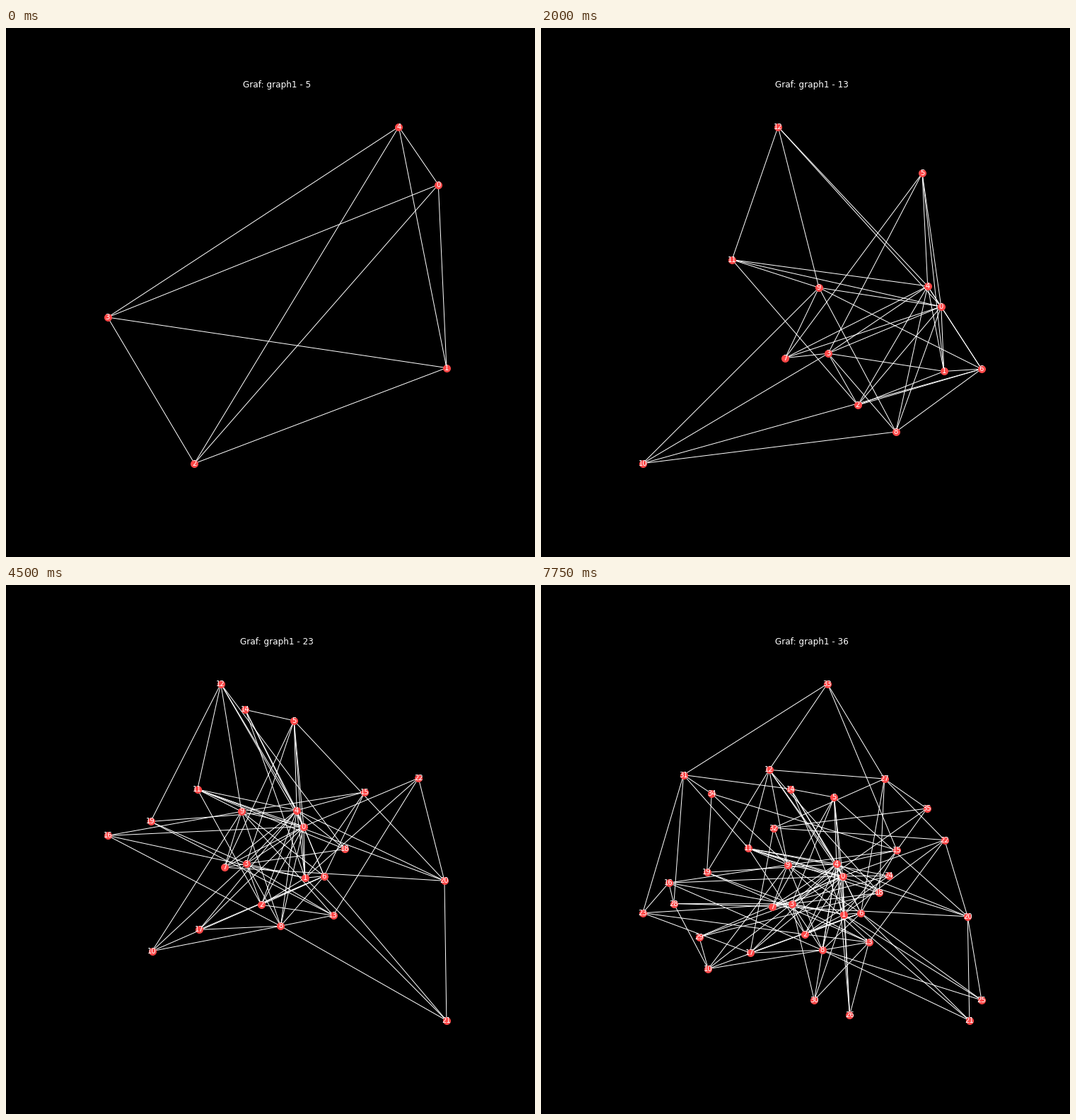
Recreate the animation shown at these times as a matplotlib script. Size 748 by 748 pixels, loop 8 s.

```python
from itertools import combinations

import matplotlib.pyplot as plt
import numpy as np
from matplotlib.animation import FuncAnimation
from matplotlib.collections import LineCollection

SIZE, DPI = 748, 72
FIRST, LAST = 5, 36
STEP_MS = 250
MARGIN = 0.105  # share of the data span left free on each side

# Node places; y points down.
NODES = np.array([
    (426.53, 411.55), (428.32, 465.68), (373.40, 493.93), (354.51, 450.74),
    (417.92, 394.46), (414.48, 300.08), (452.26, 463.73), (327.17, 454.51),
    (397.67, 516.28), (348.66, 395.73), (236.37, 542.71), (293.28, 372.33),
    (322.61, 261.30), (463.58, 505.05), (353.24, 288.50), (503.23, 375.17),
    (180.70, 421.10), (295.70, 520.10), (478.40, 435.30), (234.56, 406.30),
    (603.20, 468.70), (605.80, 615.70), (570.60, 360.50), (143.80, 463.70),
    (491.70, 411.20), (622.90, 586.90), (436.50, 608.00), (485.60, 274.00),
    (187.80, 450.50), (223.60, 497.50), (386.40, 587.00), (201.50, 268.50),
    (329.00, 343.50), (405.00, 139.70), (241.30, 295.00), (545.70, 316.00),
])

# Every node after the first five joins four earlier ones.
LINKS = [
    (0, 1, 3, 4), (0, 1, 2, 4), (0, 3, 4, 5), (0, 3, 4, 6), (0, 6, 7, 8),
    (3, 6, 8, 9), (0, 2, 4, 9), (0, 4, 9, 11), (2, 3, 8, 9), (0, 1, 4, 5),
    (1, 4, 6, 9), (0, 1, 8, 9), (0, 4, 6, 8), (3, 4, 11, 12), (3, 4, 12, 13),
    (4, 5, 7, 11), (1, 6, 8, 20), (0, 1, 13, 20), (2, 3, 16, 17),
    (0, 2, 7, 11), (1, 6, 8, 20), (0, 1, 4, 13), (6, 12, 18, 22),
    (3, 7, 10, 16), (0, 3, 10, 18), (1, 3, 4, 13), (11, 14, 23, 28),
    (9, 17, 22, 27), (12, 15, 27, 31), (9, 15, 19, 31), (3, 15, 27, 32),
]
EDGES = list(combinations(range(FIRST), 2))
EDGES += [(old, new) for new, row in enumerate(LINKS, FIRST) for old in row]

fig = plt.figure(figsize=((SIZE + 1e-6) / DPI,) * 2, dpi=DPI, facecolor="black")
ax = fig.add_axes([0.125, 0.11, 0.775, 0.77])
ax.axis("off")
title = ax.set_title("", color="white", fontsize=12, family="DejaVu Sans")
lines = LineCollection([], colors="white", linewidths=1, zorder=1)
ax.add_collection(lines, autolim=False)
dots = ax.scatter([], [], s=100, c="#ff4848", linewidths=1, zorder=2)
labels = [
    ax.text(x, y, str(i), color="white", fontsize=10, family="DejaVu Sans",
            ha="center", va="center", zorder=3)
    for i, (x, y) in enumerate(NODES)
]


def draw(frame):
    count = FIRST + frame
    shown = NODES[:count]
    low, high = shown.min(axis=0), shown.max(axis=0)
    pad = MARGIN * (high - low)
    ax.set_xlim(low[0] - pad[0], high[0] + pad[0])
    ax.set_ylim(high[1] + pad[1], low[1] - pad[1])
    lines.set_segments([NODES[[a, b]] for a, b in EDGES if b < count])
    dots.set_offsets(shown)
    for i, label in enumerate(labels):
        label.set_visible(i < count)
    title.set_text(f"Graf: graph1 - {count}")
    return [lines, dots, title, *labels]


anim = FuncAnimation(fig, draw, frames=LAST - FIRST + 1, interval=STEP_MS,
                     init_func=lambda: draw(0), repeat=True, repeat_delay=0)
plt.show()
```
